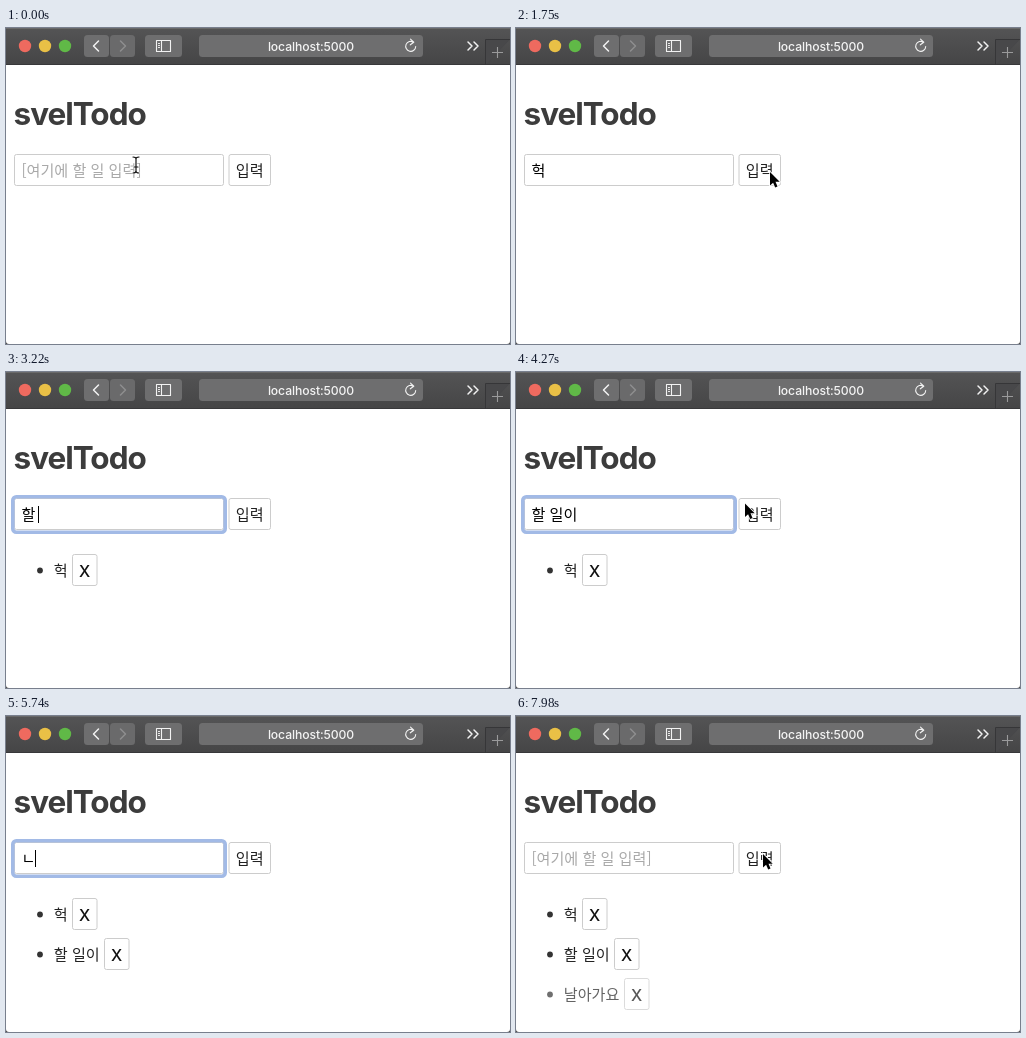
Recreate the animation shown at these times as an HTML page. Size 504 by 316 pixels, loop 8 s.

```html
<!DOCTYPE html>
<html lang="ko">
<head>
<meta charset="utf-8">
<title>svelTodo</title>
<style>
  html, body { margin: 0; width: 100%; height: 100%; overflow: hidden; background: #fff; }
  svg { display: block; width: 504px; height: 316px; }
  text { font-family: "Noto Sans CJK KR", "Noto Sans CJK", sans-serif; font-size: 15.1px; fill: #222; white-space: pre; }
  .latin { font-family: Inter, sans-serif; }
  .box { fill: #fff; stroke: #ccc; }
  .line { fill: none; stroke-linecap: round; stroke-linejoin: round; }
</style>
</head>
<body>
<svg viewBox="0 0 504 316">
  <defs>
    <linearGradient id="bar" x2="0" y2="1">
      <stop stop-color="#545455"/><stop offset="1" stop-color="#454546"/>
    </linearGradient>
  </defs>
  <rect width="504" height="316" fill="#fff"/>

  <rect width="504" height="37" fill="url(#bar)"/>
  <path d="M0 .5H504" stroke="#6a6a6a"/>
  <path d="M0 36.5H504" stroke="#38383a"/>
  <circle cx="19" cy="18" r="6.200" fill="#ee6a5f"/>
  <circle cx="39" cy="18" r="6.200" fill="#e9c046"/>
  <circle cx="59" cy="18" r="6.200" fill="#60b947"/>
  <g fill="#6e6e6f">
    <rect x="78" y="7" width="25" height="22" rx="3.5"/>
    <rect x="104" y="7" width="25" height="22" rx="3.5" fill="#6a6a6b"/>
    <rect x="139" y="7" width="37" height="22" rx="3.5"/>
    <rect x="193" y="7" width="224" height="22" rx="3.5"/>
  </g>
  <g class="line" stroke="#f2f2f2" stroke-width="1.500">
    <path d="M92.500 13l-5 5l5 5"/>
    <path d="M114.500 13l5 5l-5 5" stroke="#8e8e8f"/>
    <path d="M150.500 12.500H164.500V23.500H150.500ZM155.500 12.500V23.500M152.500 15.500h1M152.500 17.500h1M152.500 19.500h1" stroke-width="1.100"/>
    <path d="M407.500 14.200A5 5 0 1 0 409.700 18.500M404.500 11.200l3.300 3l-3.500 2.600" stroke-width="1.100"/>
    <path d="M462 14l4 4l-4 4M468 14l4 4l-4 4"/>
  </g>
  <path d="M479.500 37V11.500H504" fill="#48484a" stroke="#363638"/>
  <path d="M491.500 19V30M486 24.500H497" stroke="#9a9a9b" stroke-width="1.100"/>
  <text class="latin" x="305" y="23" text-anchor="middle" style="font-size:12.2px;font-weight:500;fill:#f4f4f4;letter-spacing:-.1px">localhost:5000</text>

  <text class="latin" x="7.500" y="97.300" style="font-size:31.500px;font-weight:700;fill:#3c3c3c;letter-spacing:-1px">svelTodo</text>

  <rect class="box" x="8.500" y="126.500" width="209" height="31" rx="2"/>
  <rect id="ring" x="6.800" y="124.800" width="212.400" height="35.400" rx="3.500" fill="none" stroke="#a2bae6" stroke-width="3.600"/>
  <text id="value" x="15.400" y="148"/>
  <path id="caret" d="M0 134V151" stroke="#000"/>
  <rect class="box" x="223" y="126.500" width="41.500" height="31" rx="2"/>
  <text x="229.800" y="148">입력</text>
  <g id="list"></g>

  <path id="arrow" d="M0 0V13.600L3.100 10.700L5.200 15.400L7.500 14.400L5.500 9.800H9.700Z" stroke="#fff" stroke-width="1.600" paint-order="stroke"/>
  <g id="beam" class="line">
    <path d="M-3 -8Q0 -8 0 -6V6Q0 8 -3 8M3 -8Q0 -8 0 -6M3 8Q0 8 0 6M-2 2H2" stroke="#fff" stroke-opacity=".8" stroke-width="2.600"/>
    <path d="M-3 -8Q0 -8 0 -6V6Q0 8 -3 8M3 -8Q0 -8 0 -6M3 8Q0 8 0 6M-2 2H2" stroke="#111" stroke-width="1.200"/>
  </g>
  <path d="M0 313V316H3A3 3 0 0 1 0 313ZM504 313V316H501A3 3 0 0 0 504 313Z" fill="#444"/>
</svg>
<script>
const LOOP = 8000, STEP = 70, FADE = 400, CARET_ON = 420;
const HINT = '[여기에 할 일 입력]';
const $ = id => document.getElementById(id);

// Each round: focus the field, type, press the button (blur), add the item.
const rounds = [
  { focus: 210, blur: 1750, add: 1820, show: 1190,
    keys: [[630, 'ㅎ'], [700, '허'], [840, '헉']] },
  { focus: 2310, blur: 4690, add: 4760, show: 4130,
    keys: [[2660, 'ㅎ'], [2800, '하'], [2870, '할'], [3220, '할 '], [3360, '할 ㅇ'],
           [3430, '할 이'], [3570, '할 일'], [3710, '할 일ㅇ'], [3780, '할 일이']] },
  { focus: 5320, blur: 7630, add: 7700, show: 7000,
    keys: [[5670, 'ㄴ'], [5810, '나'], [5950, '날'], [6090, '날ㅇ'], [6160, '날아'],
           [6300, '날악'], [6440, '날아가'], [6510, '날아강'], [6650, '날아가요']] }
];

// Pointer path: time, x, y
const path = [
  [0, 130, 137], [140, 130, 137], [210, 132, 137], [1190, 132, 137], [1470, 254, 144],
  [1820, 254, 144], [2240, 129, 132], [4130, 129, 132], [4270, 229, 131.5], [4480, 247, 135],
  [4760, 247, 135], [5110, 155, 127], [7000, 155, 127], [7210, 241, 127.5], [7490, 247, 138],
  [LOOP, 247, 138]
];

const textWidth = s => [...s].reduce((w, c) => w + (c === ' ' ? 3.4 : 13.9), 0);
const lastKey = (keys, t) => keys.filter(k => k[0] <= t).pop();

rounds.forEach((r, i) => {
  const label = r.keys[r.keys.length - 1][1];
  const y = 182 + 40 * i, x = Math.round(52.5 + textWidth(label));
  $('list').insertAdjacentHTML('beforeend', `<g>
    <circle cx="34" cy="${y + 16.5}" r="2.900" fill="#333"/>
    <text x="47.800" y="${y + 21.5}">${label}</text>
    <rect class="box" x="${x + .5}" y="${y + .5}" width="24.500" height="31" rx="2"/>
    <text class="latin" x="${x + 12.5}" y="${y + 22.8}" text-anchor="middle" style="font-size:16px;font-weight:500;fill:#111">X</text>
  </g>`);
  r.node = $('list').lastElementChild;
});

function pointer(t) {
  const i = path.findIndex(p => p[0] > t);
  const [t0, x0, y0] = path[i - 1], [t1, x1, y1] = path[i];
  const k = (t - t0) / (t1 - t0), e = k * k * (3 - 2 * k);
  return [x0 + (x1 - x0) * e, y0 + (y1 - y0) * e];
}

function draw(t) {
  const round = rounds.find(r => t >= r.focus && t < r.add);
  const key = round && lastKey(round.keys, t);
  const focused = round && t < round.blur;

  $('ring').style.opacity = focused ? 1 : 0;
  $('value').textContent = key ? key[1] : HINT;
  $('value').style.fill = key ? '#000' : '#a9a9a9';
  $('value').style.fontWeight = key ? 500 : 400;
  $('caret').style.opacity = focused && (!key || t - key[0] < CARET_ON) ? 1 : 0;
  $('caret').setAttribute('transform', `translate(${Math.floor(15.4 + textWidth(key ? key[1] : '')) + .5})`);

  for (const r of rounds)
    r.node.style.opacity = Math.max(0, Math.min(1, (t - r.add) / FADE));

  const [x, y] = pointer(t);
  const typing = key && t < round.show, inField = x < 219;
  for (const id of ['arrow', 'beam']) {
    $(id).style.display = !typing && inField === (id === 'beam') ? '' : 'none';
    $(id).setAttribute('transform', `translate(${x} ${y})`);
  }
}

const start = performance.now();
function tick() {
  const t = (performance.now() - start) % LOOP;
  draw(Math.floor(t / STEP) * STEP);
  requestAnimationFrame(tick);
}
tick();
</script>
</body>
</html>
```
